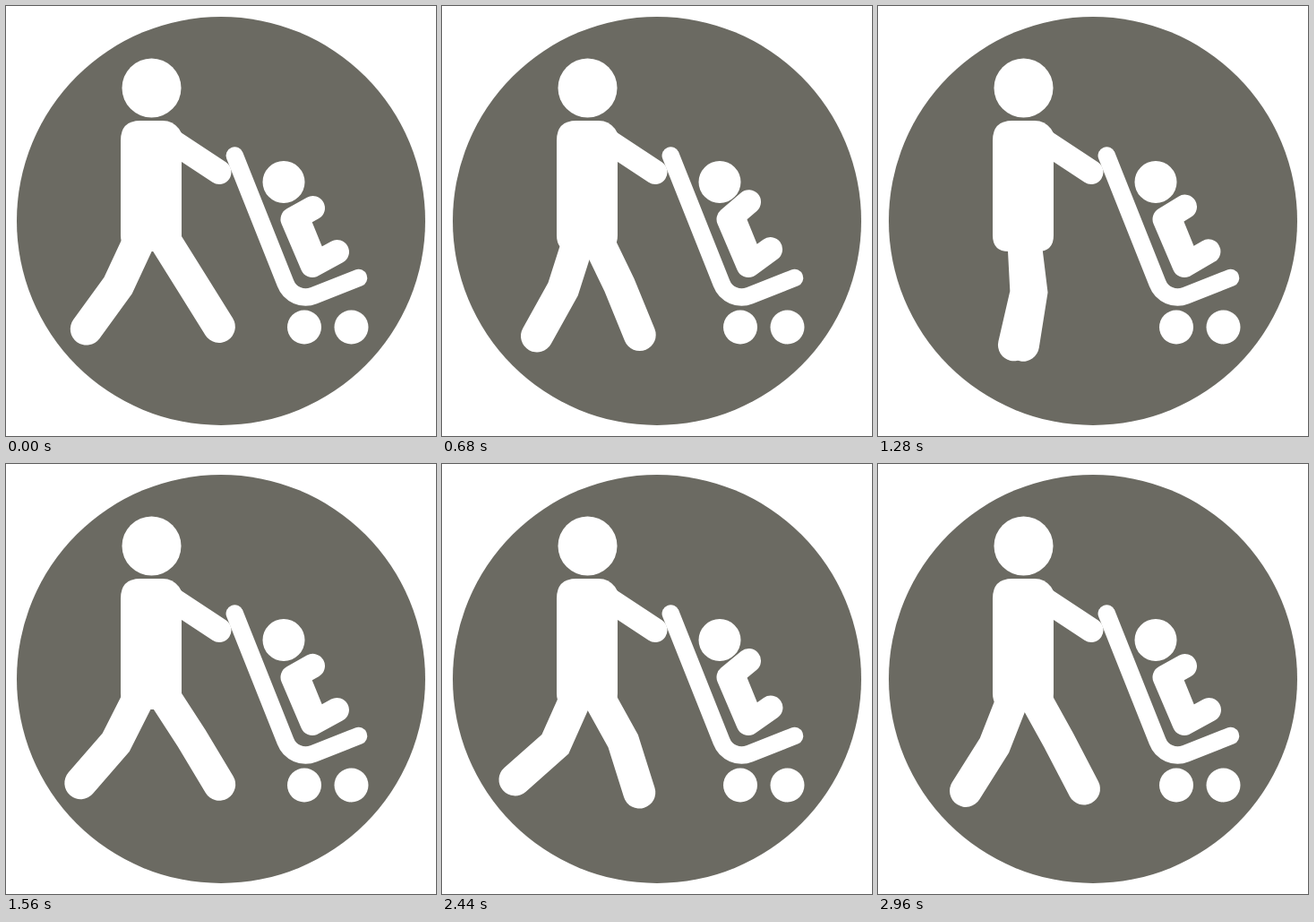
Write an HTML page that moves like this. It is 480 px wide and 480 px high and loops after 3 s.

```html
<!DOCTYPE html>
<html lang="en">
<head>
<meta charset="utf-8">
<title>Walking with a stroller</title>
<style>
  html, body { margin: 0; width: 100%; height: 100%; overflow: hidden; background: #fff; }
  svg { display: block; width: 100vw; height: 100vh; }
  .line { fill: none; stroke: #fff; stroke-linecap: round; }
</style>
</head>
<body>
<svg viewBox="0 0 480 480">
  <circle cx="240" cy="240" r="228" fill="#6b6a62"/>
  <g fill="#fff">
    <circle cx="162.5" cy="91.5" r="33"/>
    <path d="M128 150Q128 128 150 128H175Q186 128 193 137L196 142V256Q196 274 178 274H146Q128 274 128 256Z"/>
    <circle cx="310" cy="196.5" r="23.5"/>
    <circle cx="333" cy="358.5" r="19"/>
    <circle cx="385.5" cy="358.5" r="19"/>
  </g>
  <path class="line" stroke-width="27" d="M172 142L238 185.5"/>
  <path class="line" stroke-width="19.5" d="M255.3 167L312 309.5A24 24 0 0 0 343.5 323.2L393.5 303.5"/>
  <path class="line" stroke-width="27" d="M325 236L345 285"/>
  <path class="line" id="baby" stroke-width="27" stroke-linejoin="round"/>
  <path class="line" id="legA" stroke-width="36"/>
  <path class="line" id="legB" stroke-width="36"/>
</svg>
<script>
const CYCLE = 1500, STEP = 40;
const HIP = [161, 235], THIGH = 85, SHIN = 60;

// One leg's stride: time, thigh angle, shin angle (degrees, forward positive)
const STRIDE = [
  [0, 32, 32],
  [190, 29, 17.5],
  [280, 28, 19],
  [380, 13, -2],
  [530, 3, -13],
  [750, -25, -36],
  [940, -24, -48.5],
  [1030, -21, -45],
  [1130, -5, -21],
  [1280, 7, -9]
];

const draw = (id, ...points) => document.getElementById(id)
  .setAttribute('d', 'M' + points.map(p => p.join(' ')).join('L'));

// Key at any index, wrapped around the cycle
function keyAt(i) {
  const n = STRIDE.length;
  const turn = Math.floor(i / n);
  const [time, ...angles] = STRIDE[i - turn * n];
  return { time: time + turn * CYCLE, angles };
}

// Smooth cyclic spline through the stride
function anglesAt(t) {
  const i = STRIDE.findLastIndex(key => key[0] <= t);
  const [a, b, c, d] = [-1, 0, 1, 2].map(k => keyAt(i + k));
  const span = c.time - b.time;
  const u = (t - b.time) / span;
  const ease = u * u * (3 - 2 * u);
  return b.angles.map((from, k) => {
    const to = c.angles[k];
    const speedIn = (to - a.angles[k]) / (c.time - a.time) * span;
    const speedOut = (d.angles[k] - from) / (d.time - b.time) * span;
    return from + (to - from) * ease
      + u * (1 - u) * (speedIn * (1 - u) - speedOut * u);
  });
}

function reach([x, y], length, degrees) {
  const angle = degrees * Math.PI / 180;
  return [x + length * Math.sin(angle), y + length * Math.cos(angle)];
}

function drawLeg(id, t) {
  const [thigh, shin] = anglesAt(t % CYCLE);
  const knee = reach(HIP, THIGH, thigh);
  draw(id, HIP, knee, reach(knee, SHIN, shin));
}

function render(t) {
  drawLeg('legA', t);
  drawLeg('legB', t + CYCLE / 2);

  const lift = (1 - Math.cos(2 * Math.PI * t / CYCLE)) / 2;
  draw('baby', [342.5, 225.5 - 7 * lift], [320, 238],
    [342, 289.5], [369.5 - 3 * lift, 274.5 - 3 * lift]);
}

const start = performance.now();
function tick() {
  const elapsed = performance.now() - start;
  render(Math.floor(elapsed / STEP) * STEP % CYCLE);
  requestAnimationFrame(tick);
}
tick();
</script>
</body>
</html>
```
